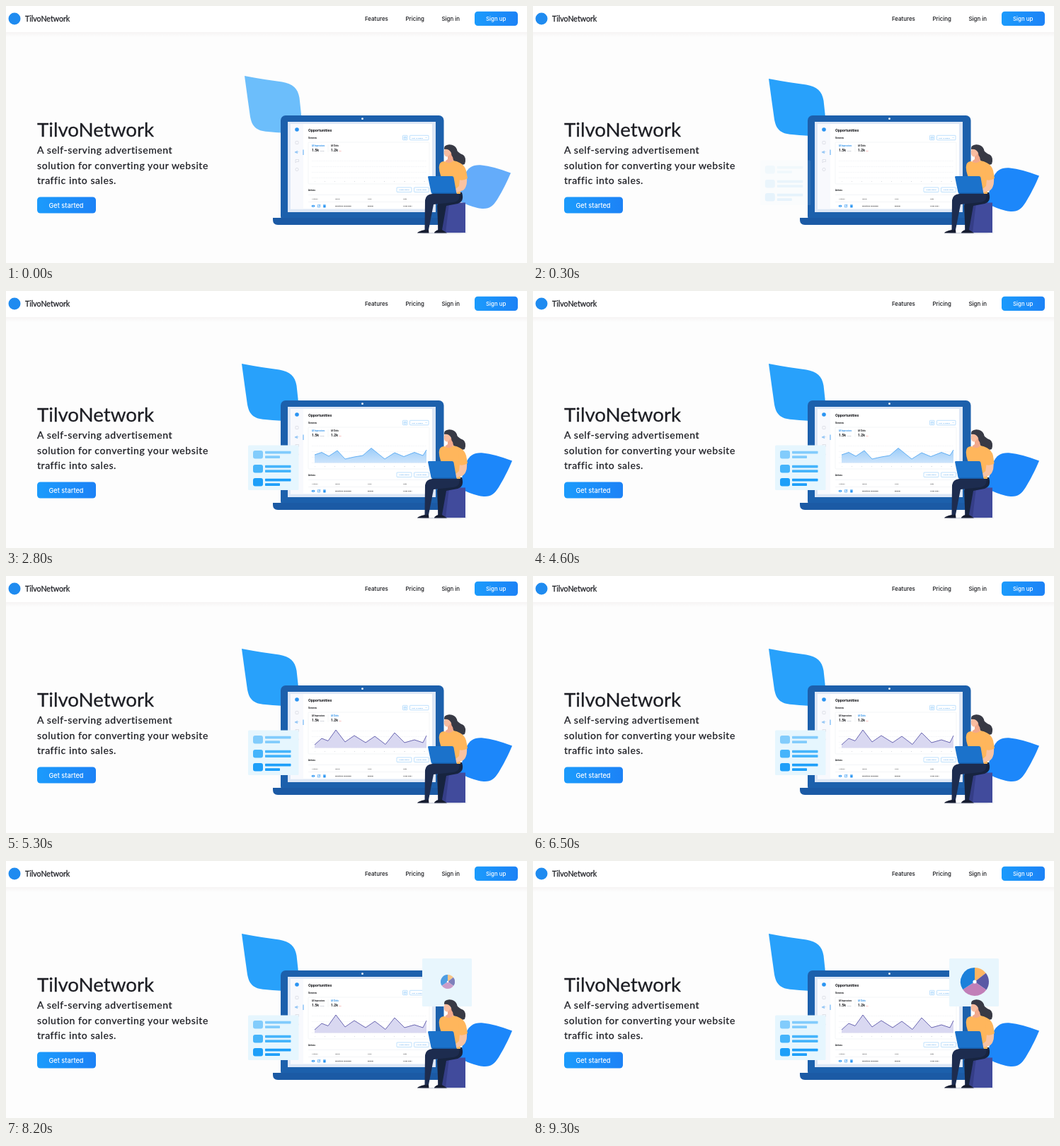
These frames come from a looping animation (736x364 px, 9700 ms). An HTML page:

```html
<!DOCTYPE html>
<html lang="en">
<head>
<meta charset="utf-8">
<title>TilvoNetwork</title>
<style>
  html, body { margin: 0; width: 100%; height: 100%; overflow: hidden; background: #fdfdfd; }
  svg { display: block; width: 100vw; height: 100vh; }
  text { font-family: Inter, Roboto, sans-serif; fill: #15161a; }
  .brand { font-family: Lato, "Open Sans", sans-serif; fill: #1d1e24; stroke: #1d1e24; stroke-width: .27; }
  .lead { font-size: 14px; letter-spacing: .58px; }
  .nav { font-size: 7.9px; font-weight: 500; }
  .ui text { font-family: Roboto, Inter, sans-serif; }
  .ui .bold { font-weight: 700; }
  .ui .tiny { font-size: 2.5px; }
  .ui .box { fill: none; stroke: #7cc0f8; stroke-width: .5; }
  .ui .faint { fill: none; stroke: #e6e8ee; stroke-width: .5; }
</style>
</head>
<body>
<svg viewBox="0 0 736 364">
  <defs>
    <linearGradient id="button"><stop stop-color="#1b9bfc"/><stop offset="1" stop-color="#1c82f6"/></linearGradient>
    <linearGradient id="area" x2="0" y2="1"><stop stop-color="#9accf9"/><stop offset="1" stop-color="#cde4fb"/></linearGradient>
    <linearGradient id="shade" x2="0" y2="1"><stop stop-color="#f6f4f4"/><stop offset="1" stop-color="#fdfdfd"/></linearGradient>
    <clipPath id="wipe"><rect id="wipeRect" x="432" y="208" width="164" height="40"/></clipPath>
  </defs>

  <rect width="736" height="364" fill="#fdfdfd"/>
  <rect y="37" width="736" height="7" fill="url(#shade)"/>
  <rect width="736" height="37" fill="#fff"/>
  <circle cx="12" cy="18" r="8.5" fill="#1f8bf0"/>
  <text class="brand" x="27" y="21.7" font-size="10.6">TilvoNetwork</text>
  <g class="nav">
    <text x="507" y="21">Features</text>
    <text x="564.5" y="21">Pricing</text>
    <text x="615.5" y="21">Sign in</text>
    <rect x="662" y="7.8" width="61" height="20.2" rx="4.5" fill="url(#button)"/>
    <text x="678" y="21" style="fill:#fff">Sign up</text>
  </g>

  <text class="brand" x="44" y="184.5" font-size="27.7">TilvoNetwork</text>
  <g class="lead">
    <text class="brand" x="44" y="209.3">A self-serving advertisement</text>
    <text class="brand" x="44" y="230.6">solution for converting your website</text>
    <text class="brand" x="44" y="251.8">traffic into sales.</text>
  </g>
  <rect x="44" y="270.5" width="83" height="23" rx="4.5" fill="url(#button)"/>
  <text x="60.5" y="285.7" font-size="9.2" font-weight="500" style="fill:#fff">Get started</text>

  <path id="leafLeft" fill="#28a1fb" d="M333 103 Q362 108.500 386 111.500 C401 114 408.500 121 410.500 134 L416 185 Q386 184 366 182 C349 181 343.500 174 341 161 Q337 133 333 103Z"/>
  <path id="leafRight" fill="#1c87fa" d="M715 240.500 Q690 231 674 229.500 C662 228.500 655 232 650 243 L640 279 Q655 287 668 290 C683 293 689 289 696 278 Q707 260 715 240.500Z"/>

  <g>
    <rect x="388" y="155" width="230.500" height="150" rx="7" fill="#1c60ac"/>
    <rect x="398" y="164" width="209" height="128" fill="#dde7f6"/>
    <rect x="402" y="167" width="200" height="120.500" fill="#fff"/>
    <rect x="402" y="167" width="18" height="120.500" fill="#f8f9fd"/>
    <circle cx="503.500" cy="159.700" r="1.400" fill="#fff"/>
    <path d="M377 300H634V303Q634 310 627 310H384Q377 310 377 303Z" fill="#1b5aa5"/>
  </g>

  <g class="ui">
    <circle cx="411" cy="175" r="2.800" fill="#2a94f2"/>
    <g class="faint" style="stroke:#c6cbd4">
      <rect x="409" y="191.500" width="4" height="4" rx=".6"/>
      <path d="M409 217.500h4.500v3h-3l-1.500 1.500z"/>
      <circle cx="411" cy="231.500" r="2.100"/>
    </g>
    <path d="M408.500 206.300h1.200l2-1v3.500l-2-1h-1.200zM413 206.500h.8" fill="#9ccaf5" stroke="#7ab9f3" stroke-width=".5"/>
    <path d="M420 203.500v7.500" stroke="#2a94f2" stroke-width=".8"/>
    <text class="bold" x="427" y="178" font-size="5.400">Opportunities</text>
    <text class="bold" x="427" y="188.300" font-size="2.900">Overview</text>
    <rect class="box" x="560.500" y="183.300" width="6.500" height="6.500" rx=".8"/>
    <path class="box" d="M562.300 185.300h3v3h-3zM562.300 186.200h3"/>
    <rect class="box" x="570.500" y="183.300" width="26.500" height="6.500" rx=".8"/>
    <text class="tiny" x="573" y="187.500" style="fill:#3a98ee">Last 12 weeks</text>
    <path class="box" d="M592.500 186l1 1 1-1"/>
    <rect class="faint" x="427" y="193" width="171" height="59" rx="1"/>
    <path class="faint" d="M455 196v11"/>
    <text id="tabViews" class="bold" x="432" y="199.400" font-size="2.600">All Impressions</text>
    <text id="tabClicks" class="bold" x="459" y="199.400" font-size="2.600">All Clicks</text>
    <text class="bold" x="432" y="206" font-size="5">1.5k</text>
    <text class="tiny" x="443.500" y="206" style="fill:#66708a">+10%</text>
    <text class="bold" x="459" y="206" font-size="5">1.2k</text>
    <text class="tiny" x="470" y="206" style="fill:#ef5350">-5%</text>
    <path class="faint" stroke-dasharray="1.500 1" d="M432 219.500H594M432 227.500H594M432 235.500H594M432 243.500H594"/>
    <g id="axis"></g>
    <g id="blueChart" clip-path="url(#wipe)"></g>
    <g id="purpleChart"></g>
    <text class="bold" x="427" y="262" font-size="2.900">Actions</text>
    <rect class="box" x="552" y="257" width="21" height="6.500" rx=".8"/>
    <rect class="box" x="576.500" y="257" width="21" height="6.500" rx=".8"/>
    <g class="tiny">
      <text x="555" y="261.200" style="fill:#2b8fe9">Create status</text>
      <text x="579.500" y="261.200" style="fill:#2b8fe9">Create status</text>
      <text x="432" y="273.500">Actions</text><text x="465" y="273.500">Name</text>
      <text x="511" y="273.500">Type</text><text x="561" y="273.500">Date</text>
      <text x="465" y="284" class="bold">Milestone campaign</text><text x="511" y="284" class="bold">Banner</text>
      <text x="561" y="284" class="bold">3 Dec 2021</text>
    </g>
    <path class="faint" d="M427 267.500H598M427 277.500H598"/>
    <ellipse cx="434" cy="283.300" rx="2.400" ry="1.500" fill="#2a94f2"/><circle cx="434" cy="283.300" r=".7" fill="#fff"/>
    <path d="M440.300 281.700h3.300v3.300h-3.300zM441.500 284l2.500-2.700" fill="none" stroke="#2a94f2" stroke-width=".6"/>
    <path d="M448.500 282.200h2.800v3h-2.800zM448.100 281.400h3.600" fill="#2a94f2" stroke="#2a94f2" stroke-width=".5"/>
  </g>

  <g id="listCard"><rect x="342" y="218.500" width="71.500" height="63.500" rx="1.500" fill="#e6f6fe"/></g>

  <g id="pieCard"><rect x="588" y="138" width="70" height="68" rx="1.500" fill="#e8f6fd"/></g>
  <g id="pie"></g>

  <g>
    <ellipse cx="616" cy="321.700" rx="35" ry="1" fill="#d9dce6"/>
    <path d="M618 278.500H649V321H618Z" fill="#414b9c"/>
    <path d="M612 279H626L621 321H610Z" fill="#353e87"/>
    <path d="M644 264Q648 277 638 280L622 283 616 317H610.500L609 283Q610 277 617 274L626 264Z" fill="#17243f"/>
    <path d="M640 265Q643 276 632 278L604 281 597 317H591.500L592 275Q593 267 602 266Z" fill="#1d2c4f"/>
    <path d="M591.500 317H597L597.500 321.500H581Q582 319 591.500 317ZM610.500 317H616L623 321.500H605Q605 319 610.500 317Z" fill="#161c30"/>
    <path d="M630 198Q636 200 638 206Q641 209 646 211Q651 215 648 224Q640 227 634 221L628 213Z" fill="#383a45"/>
    <path d="M619 220Q626 223 632 219Q643 221 647 228L641 245 642 266H619Q619 250 614 240Q610 228 613 223Q615 220 619 220Z" fill="#ffb65c"/>
    <path d="M624 210L630 207 632 219Q627 225 620 220L624 217Z" fill="#f2a88a"/>
    <ellipse cx="623.500" cy="206.500" rx="4.700" ry="7" transform="rotate(8 623.500 206.500)" fill="#f9bda0"/>
    <path d="M619 203Q618 197 626 196.300Q634 196 637 203Q638 210 634 216Q629 214 629 208Q626 202 619 203Z" fill="#383a45"/>
    <g id="arm">
      <path d="M641 245L651 244Q652 256 646 261L634 265 633 261 640 255Z" fill="#f9c3a2"/>
      <path d="M640 222Q648 225 650 233L652 244Q646 248 640 246L639 234Z" fill="#ffb65c"/>
    </g>
    <path d="M596 242Q596 241 598 241H630Q632 241 632.500 243L636.500 266H603Q601 266 600.500 264Z" fill="#1b72cb"/>
    <path d="M603 266H637L636 264.500H602Z" fill="#145ca9"/>
  </g>
</svg>

<script>
const LOOP = 9700, STEP = 100;
const el = id => document.getElementById(id);
const clamp = x => Math.max(0, Math.min(1, x));
const progress = (t, from, to) => clamp((t - from) / (to - from));
const easeInOut = u => u < .5 ? 2 * u * u : 1 - 2 * (1 - u) ** 2;
const place = (id, x, y, opacity) => {
  el(id).setAttribute("transform", `translate(${x} ${y})`);
  el(id).setAttribute("opacity", opacity);
};

function drawChart(id, points, fill, stroke) {
  el(id).innerHTML = `<path d="M436 243.500L${points}L594 243.500Z" fill="${fill}"/>
    <path d="M${points}" fill="none" stroke="${stroke}" stroke-width=".8" stroke-linejoin="round"/>`;
}

function drawAxis() {
  for (let i = 0; i < 12; i++)
    el("axis").innerHTML += `<text x="${436 + i * 14}" y="248.500" font-size="2" style="fill:#9aa1b0">${i + 1}</text>`;
}

function drawList() {
  const bar = (x, y, w, h, r, c) => `<rect x="${x}" y="${y}" width="${w}" height="${h}" rx="${r}" fill="${c}"/>`;
  const rows = [[226, 21, "#82ccfc"], [246, 36.5, "#45b4fb"], [265, 21, "#1d9ff9"]];
  for (const [y, w, color] of rows)
    el("listCard").innerHTML += bar(349, y, 14, 11.5, 3, color)
      + bar(366, y + .7, 36.5, 3.7, .7, color) + bar(366, y + 7.2, w, 3.7, .7, color);
}

function drawPie() {
  const at = deg => {
    const a = deg * Math.PI / 180;
    return `${20 * Math.sin(a)} ${-20 * Math.cos(a)}`;
  };
  const slices = [[0, 52, "#fdb562"], [52, 125, "#5a59a5"], [125, 237, "#c17fb8"], [237, 360, "#1b80da"]];
  el("pie").innerHTML = slices.map(([a, b, color]) =>
    `<path d="M0 0L${at(a)}A20 20 0 0 1 ${at(b)}Z" fill="${color}"/>`).join("")
    + `<circle r="2.600" fill="#fff"/>`;
}

function render(t) {
  const leaf = progress(t, 0, 300);
  place("leafLeft", 4 * (1 - leaf), -4 * (1 - leaf), .68 + .32 * leaf);
  place("leafRight", -2 * (1 - leaf), -4 * (1 - leaf), .68 + .32 * leaf);

  const list = easeInOut(progress(t, 100, 1000));
  place("listCard", -23.5 * (1 - list), 0, list);

  el("wipeRect").setAttribute("width", 164 * easeInOut(progress(t, 1300, 2300)));
  const swap = progress(t, 4900, 5300);
  el("blueChart").setAttribute("opacity", 1 - swap);
  el("purpleChart").setAttribute("opacity", swap);
  el("tabViews").style.fill = swap < .5 ? "#2b8fe9" : "#15161a";
  el("tabClicks").style.fill = swap < .5 ? "#15161a" : "#2b8fe9";

  const reach = Math.sin(Math.PI * progress(t, 3900, 4900)) ** 2;
  el("arm").setAttribute("transform", `rotate(${2.5 * reach} 643 230)`);

  const card = easeInOut(progress(t, 6600, 7600));
  place("pieCard", 0, 9.4 * (1 - card), clamp(card * 1.27));
  const pie = easeInOut(progress(t, 7600, 8800));
  el("pie").setAttribute("transform", `translate(624 171) scale(${pie})`);
  el("pie").setAttribute("opacity", clamp(pie * 1.5));
}

drawAxis();
drawList();
drawPie();
drawChart("blueChart", "436 232 446 228.500 456 234 468 226 479 238 492 235 504 233 516 222.500 535 238 549 229 562 234.500 577 228.500 589 233 594 225",
  "url(#area)", "#46a0f0");
drawChart("purpleChart", "436 239 446 230 455 233.500 466 218 479 235 492 226 508 236 521 227 536 238.500 549 222 563 236 577 232 589 236 594 226",
  "#d9d8f1", "#4a459f");

const start = performance.now();
function tick() {
  const t = (performance.now() - start) % LOOP;
  render(Math.floor(t / STEP) * STEP);
  requestAnimationFrame(tick);
}
tick();
</script>
</body>
</html>
```
